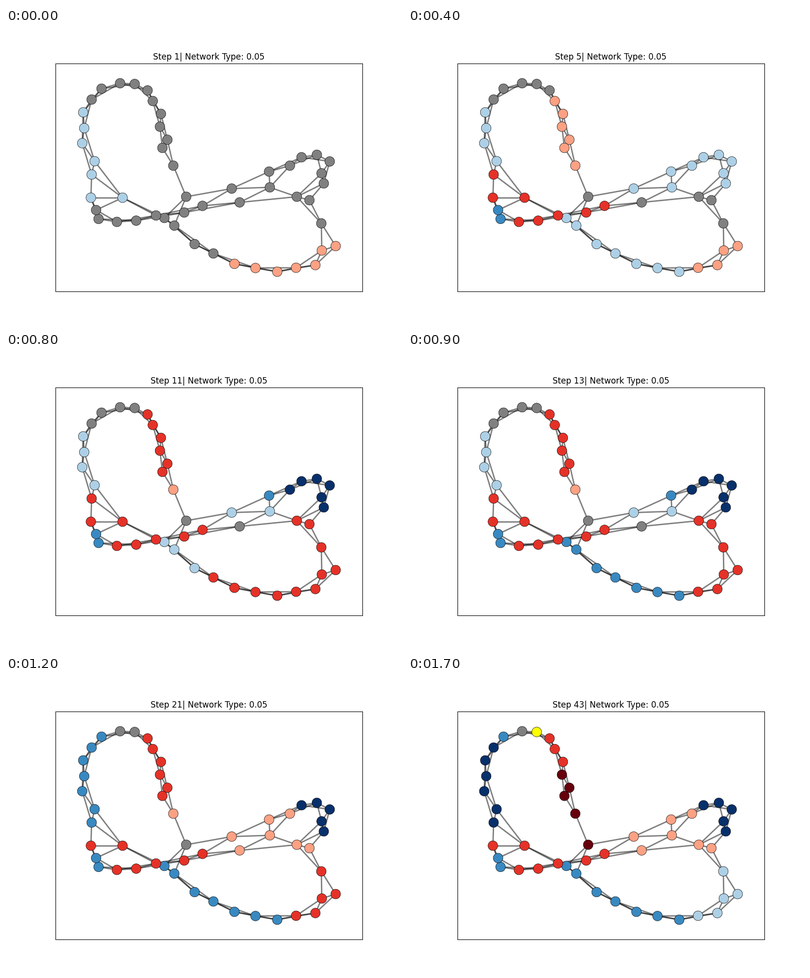
Write a matplotlib script that moves like this. It is 800 px wide and 600 px high and loops after 1800 ms.

```python
import matplotlib.pyplot as plt
import numpy as np
from matplotlib.animation import FuncAnimation
from matplotlib.collections import LineCollection

plt.rcParams["font.family"] = "DejaVu Sans"

# Node centres in pixels, in ring order
NODES = np.array([
    (230.5, 112), (260, 113.5), (286, 126.5), (296.5, 148), (313, 174),
    (311, 200), (326, 226.5), (316, 243), (338, 279), (364, 342),
    (320, 385), (340, 400.5), (381, 438), (419, 457), (461.5, 478),
    (504, 486.5), (548, 494), (586, 486), (625, 480.5), (638, 451),
    (666, 442), (637, 396), (613, 349), (587.5, 342), (642, 315),
    (637.5, 294.5), (654, 270.5), (628, 257), (597, 262), (573.5, 279),
    (531.5, 291), (533, 323), (456, 325.5), (472, 353.5), (397, 360.5),
    (360, 374), (303, 380), (263, 390.5), (224, 393), (187, 387),
    (182, 369), (171.5, 344), (235.5, 344), (173, 297), (179, 270),
    (154, 233.5), (158, 203), (156, 171), (173, 145), (193, 123),
])
COUNT = len(NODES)

# Ring lattice with a few rewired links
CUT = {(8, 10), (9, 11), (21, 23), (33, 34)}
ADDED = [(10, 33), (24, 32), (24, 34), (11, 43), (37, 43)]

BLUES, REDS = plt.get_cmap("Blues"), plt.get_cmap("Reds")
GRAY = (128 / 255, 128 / 255, 128 / 255, 1)
YELLOW = (1, 1, 0, 1)
BLUE1, BLUE2, BLUE3 = BLUES(0.33), BLUES(0.66), BLUES(1.0)
RED1, RED2, RED3 = REDS(0.33), REDS(0.66), REDS(1.0)

STEPS = [1, 2, 3, 4, 5, 6, 7, 9, 11, 13, 16, 19, 21, 24, 27, 31, 37, 43]

# (frame, first node, last node, new colour)
EVENTS = [
    (0, 42, 48, BLUE1), (0, 15, 21, RED1),
    (1, 35, 41, BLUE2),
    (2, 35, 39, RED2),
    (3, 11, 17, BLUE1), (3, 4, 9, RED1),
    (4, 42, 44, RED2), (4, 25, 33, BLUE1),
    (5, 14, 20, RED2),
    (6, 18, 24, RED2), (6, 25, 31, BLUE2),
    (7, 3, 8, RED2),
    (8, 25, 30, BLUE3),
    (9, 11, 17, BLUE2),
    (10, 30, 34, RED1),
    (11, 23, 24, RED1),
    (12, 44, 50, BLUE2),
    (13, 18, 22, BLUE1), (13, 44, 49, BLUE3),
    (14, 6, 10, RED3),
    (16, 2, 2, YELLOW),
]


def build_edges():
    ring = [(i, (i + gap - 1) % COUNT + 1)
            for i in range(1, COUNT + 1) for gap in (1, 2)]
    return [pair for pair in ring if pair not in CUT] + ADDED


def node_colors(frame):
    colors = np.tile(GRAY, (COUNT, 1))
    for start, first, last, color in EVENTS:
        if start <= frame:
            colors[first - 1:last] = color
    return colors


fig, ax = plt.subplots(figsize=(8, 6), dpi=100)
fig.subplots_adjust(left=0.125, right=0.9, bottom=0.11, top=0.88)
ax.set(xlim=(100, 720), ylim=(534, 72), xticks=[], yticks=[])

lines = [(NODES[a - 1], NODES[b - 1]) for a, b in build_edges()]
ax.add_collection(LineCollection(lines, colors="black", linewidths=2,
                                 alpha=0.5, zorder=1))
dots = ax.scatter(NODES[:, 0], NODES[:, 1], s=200, c=node_colors(0),
                  edgecolors="black", linewidths=0.5, zorder=2)
title = ax.set_title("")


def update(frame):
    dots.set_facecolor(node_colors(frame))
    title.set_text(f"Step {STEPS[frame]}| Network Type: 0.05")
    return dots, title


anim = FuncAnimation(fig, update, frames=len(STEPS), interval=100,
                     repeat=True, repeat_delay=0)
plt.show()
```
